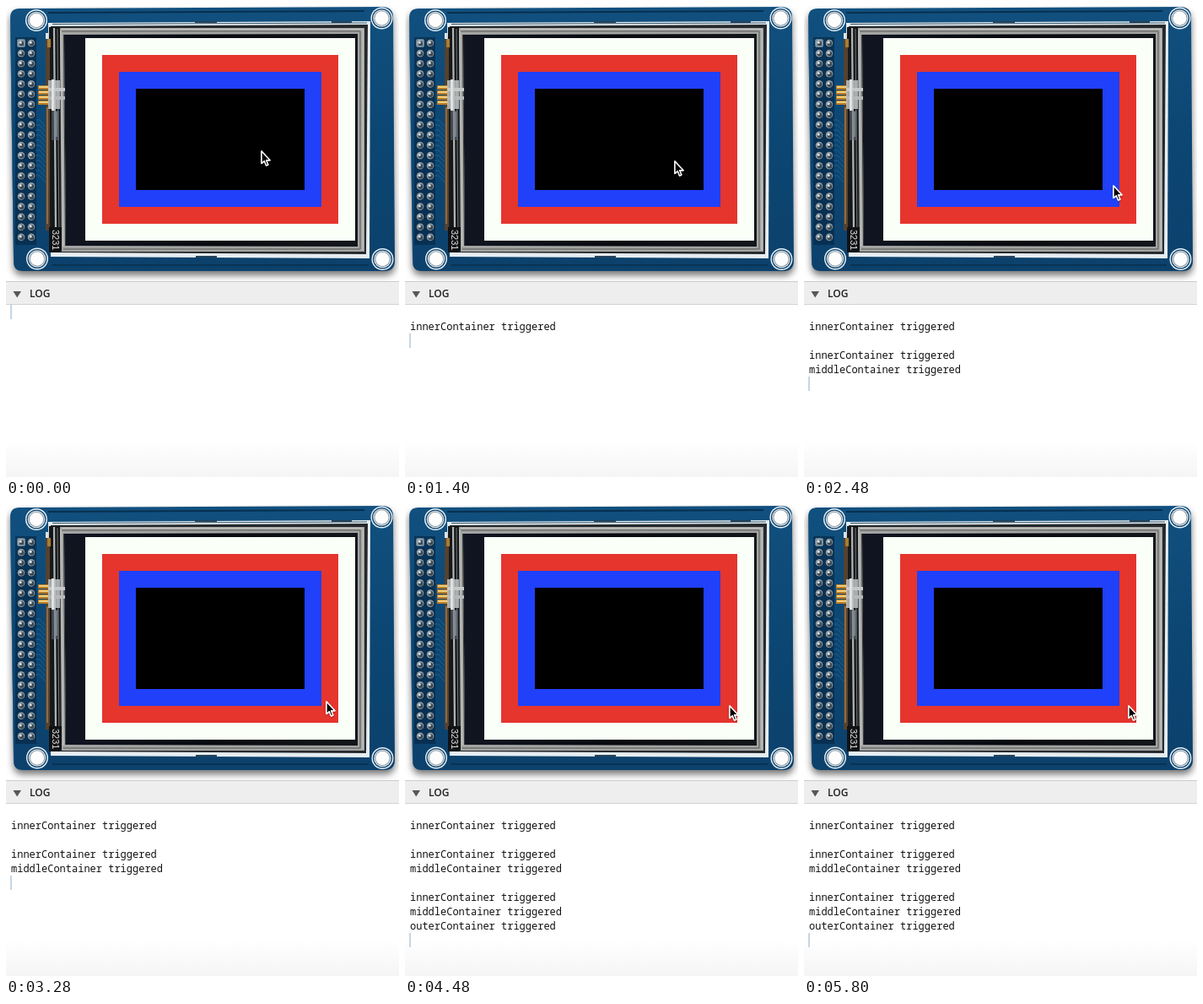
An HTML page with a canvas that plays this animation: 466 px wide and 558 px high, repeating every 5.84 s.

```html
<!DOCTYPE html>
<html lang="en">
<head>
<meta charset="utf-8">
<title>Touch display log</title>
<style>
html, body { margin: 0; width: 100%; height: 100%; overflow: hidden; background: #fff; }
canvas { display: block; }
</style>
</head>
<body>
<canvas id="stage" width="466" height="558"></canvas>
<script>
const W = 466, H = 558, LOOP = 5840;
const ctx = document.getElementById('stage').getContext('2d');
const scene = document.createElement('canvas');
scene.width = W;
scene.height = H;
const g = scene.getContext('2d');

function box(color, x, y, w, h) {
  g.fillStyle = color;
  g.fillRect(x, y, w, h);
}

function disc(color, x, y, r) {
  g.fillStyle = color;
  g.beginPath();
  g.arc(x, y, r, 0, 7);
  g.fill();
}

function poly(c, pts) {
  c.beginPath();
  pts.forEach(([x, y]) => c.lineTo(x, y));
  c.closePath();
}

function line(color, width, pts) {
  g.strokeStyle = color;
  g.lineWidth = width;
  g.beginPath();
  pts.forEach(([x, y]) => g.lineTo(x, y));
  g.stroke();
}

function fade(x0, y0, x1, y1, ...colors) {
  const f = g.createLinearGradient(x0, y0, x1, y1);
  colors.forEach((c, i) => f.addColorStop(i / (colors.length - 1), c));
  return f;
}

function boardPath() {
  g.beginPath();
  g.moveTo(16, 3);
  g.lineTo(446, 1);
  g.quadraticCurveTo(459, 1, 459, 13);
  g.lineTo(461, 302);
  g.quadraticCurveTo(461, 314, 449, 314);
  g.lineTo(20, 314);
  g.quadraticCurveTo(9, 314, 9, 303);
  g.lineTo(5, 14);
  g.quadraticCurveTo(5, 3, 16, 3);
  g.closePath();
}

function hole(x, y) {
  disc('#eef4f8', x, y, 13);
  disc('#124a75', x, y, 11.6);
  disc('#d5dde2', x, y, 10.3);
  disc('#7d8b95', x, y, 9);
  disc('#fdfdfd', x, y, 8.2);
}

function pin(x, y) {
  disc('#0a2c49', x, y, 5.4);
  disc('#8b9ba6', x, y, 4.3);
  disc('#3c4a55', x + .5, y + .5, 2.9);
  disc('#d4dbe0', x - .8, y - .8, 1.6);
}

function drawBoard() {
  g.save();
  g.shadowColor = 'rgba(0,0,0,.55)';
  g.shadowBlur = 9;
  g.shadowOffsetY = 5;
  boardPath();
  g.fillStyle = fade(0, 0, 0, 314, '#11507f', '#0c4673', '#0c416c');
  g.fill();
  g.restore();
  g.save();
  boardPath();
  g.clip();
  box('rgba(4,38,67,.6)', 11, 37, 25, 246);
  line('rgba(6,40,68,.8)', 2, [[50, 8], [425, 6]]);
  line('rgba(6,40,68,.6)', 2, [[55, 307], [430, 307]]);
  for (let i = 0; i < 12; i++) {
    const y = 121 + i * 6;
    line('rgba(45,118,163,.55)', 1, [[35, y + 14], [40, y + 14], [48, y + 23], [48, 232]]);
  }
  line('#28638d', 1, [[5, 13], [9, 306]]);
  for (let i = 0; i < 20; i++) {
    const y = 44 + i * 12.1;
    pin(18, y);
    pin(30, y);
  }
  line('#b6c5cf', 1, [[14, 40], [22, 40], [22, 48], [14, 48], [14, 40]]);
  g.restore();
  [[36, 17], [445.5, 14.5], [37, 299.5], [446.5, 300]].forEach(p => hole(...p));
}

function drawPanel() {
  // Light metal rim, then the nested glass edges.
  poly(g, [[50, 20], [432, 18], [431, 299], [53, 297]]);
  g.fillStyle = '#e6edf1';
  g.fill();
  poly(g, [[53, 24], [429, 22], [427, 294], [55, 292]]);
  g.fillStyle = '#25292c';
  g.fill();
  line('#31536a', 1, [[55, 21.5], [428, 20]]);
  box('#26435a', 224, 18, 26, 2);
  box('#26435a', 386, 18, 24, 2);
  box('#26435a', 225, 296, 25, 2);
  box('#14171a', 51, 25, 13, 267);
  poly(g, [[64, 26], [425, 26], [425, 291], [66, 291]]);
  g.fillStyle = '#a4a5a3';
  g.fill();
  line('#555957', 1, [[66, 30], [420, 30], [420, 288], [68, 288]]);
  line('#cacac7', 1, [[66, 27.5], [423, 27.5], [423, 289.5]]);
  poly(g, [[69, 34], [417, 33], [417, 285], [71, 284]]);
  g.fillStyle = fade(70, 0, 417, 0, '#111521', '#080a10', '#13161a');
  g.fill();
  line('#b3b5b3', 2.2, [[57, 26], [59, 266]]);
  line('#777b7b', 1, [[61, 27], [63, 277]]);
  line('#b9bbb8', 2, [[65, 29], [68, 285]]);
  line('#333', 1, [[68.5, 34], [70.5, 284]]);
  box('#56422e', 47, 40, 5, 226);
  box('#8b6b48', 48, 120, 2, 138);
  box('#17191c', 52, 39, 3, 225);
  box('#dce3e7', 47, 32, 3, 7);
  box('#a77d36', 49, 39, 4, 10);

  // Touch connector.
  for (let i = 0; i < 4; i++) {
    box('#b77d27', 38, 94 + i * 6, 13, 5);
    box('#edcf84', 39, 95 + i * 6, 11, 2);
  }
  box('rgba(190,194,195,.85)', 50, 88, 14, 34);
  box('#c7c9c8', 50, 97, 20, 4);
  box('#b6b9b9', 50, 107, 20, 4);
  box('#e0e2e1', 54, 87, 3, 37);
  box('rgba(100,112,124,.55)', 54, 124, 9, 35);
  box('rgba(154,164,171,.6)', 59, 125, 2, 30);

  g.save();
  g.translate(55, 265);
  g.rotate(Math.PI / 2);
  box('#101214', -3, -11, 28, 15);
  g.fillStyle = '#e4e6e5';
  g.font = '11px "Liberation Sans", sans-serif';
  g.fillText('3231', 0, 0);
  g.restore();
}

function drawScreen() {
  ['#fafff8', '#e5352d', '#2040fa', '#000'].forEach((color, i) => {
    box(color, 94 + i * 20, 38 + i * 20, 320 - i * 40, 240 - i * 40);
  });
}

function drawLogPane() {
  box('#fff', 0, 354, W, H - 354);
  box('#eee', 0, 326, W, 28);
  box('#cbcbcb', 0, 326, W, 1);
  box('#d2d2d2', 0, 353, W, 1);
  box(fade(0, 515, 0, H, '#fff', '#f5f5f5'), 0, 515, W, H - 515);
  poly(g, [[8.5, 338], [18, 338], [13.2, 345.5]]);
  g.fillStyle = '#575757';
  g.fill();
  g.fillStyle = '#222';
  g.font = '600 12px "Open Sans", sans-serif';
  g.fillText('LOG', 28, 345);
}

function drawScene() {
  box('#fff', 0, 0, W, H);
  drawBoard();
  drawPanel();
  drawScreen();
  drawLogPane();
}

// Each click bubbles outward: one blank line, then the containers it reached.
const names = ['inner', 'middle', 'outer'];
const clicks = [400, 2200, 4000];

function drawLog(t) {
  const rows = [];
  clicks.forEach((at, i) => {
    if (t < at) return;
    rows.push('');
    names.slice(0, i + 1).forEach(n => rows.push(n + 'Container triggered'));
  });
  ctx.fillStyle = '#111';
  ctx.font = '12px "Noto Sans Mono", "DejaVu Sans Mono", monospace';
  rows.forEach((s, i) => ctx.fillText(s, 6, 367 + i * 17));
  ctx.fillStyle = '#c5d6e5';
  ctx.fillRect(5, 354 + rows.length * 17, 2, 17);
}

// time, x, y of the pointer tip
const path = [
  [0, 303, 172], [80, 303, 172], [320, 308, 177], [1240, 308, 177],
  [1800, 367, 213], [2640, 367, 213], [3200, 380, 233],
  [3400, 380, 233], [3680, 385, 238], [LOOP, 385, 238]
];

function pointerAt(t) {
  const i = path.findIndex(p => t < p[0]);
  const [t0, x0, y0] = path[i - 1], [t1, x1, y1] = path[i];
  const u = (t - t0) / (t1 - t0), e = u * u * (3 - 2 * u);
  return [Math.round(x0 + (x1 - x0) * e), Math.round(y0 + (y1 - y0) * e)];
}

const arrow = [[0, 0], [0, 14.5], [3.3, 11.6], [5.5, 17], [7.8, 16], [5.6, 10.7], [10, 10.7]];

function drawPointer(t) {
  const [x, y] = pointerAt(t);
  ctx.save();
  ctx.translate(x, y);
  poly(ctx, arrow);
  ctx.shadowColor = 'rgba(0,0,0,.35)';
  ctx.shadowBlur = 2;
  ctx.shadowOffsetY = 1;
  ctx.lineJoin = 'round';
  ctx.lineWidth = 1.4;
  ctx.strokeStyle = '#fff';
  ctx.stroke();
  ctx.shadowColor = 'transparent';
  ctx.fillStyle = '#000';
  ctx.fill();
  ctx.stroke();
  ctx.restore();
}

drawScene();
const start = performance.now();

function render(now) {
  const t = Math.max(0, now - start) % LOOP;
  ctx.drawImage(scene, 0, 0);
  drawLog(t);
  drawPointer(t);
  requestAnimationFrame(render);
}
render(start);
</script>
</body>
</html>
```
